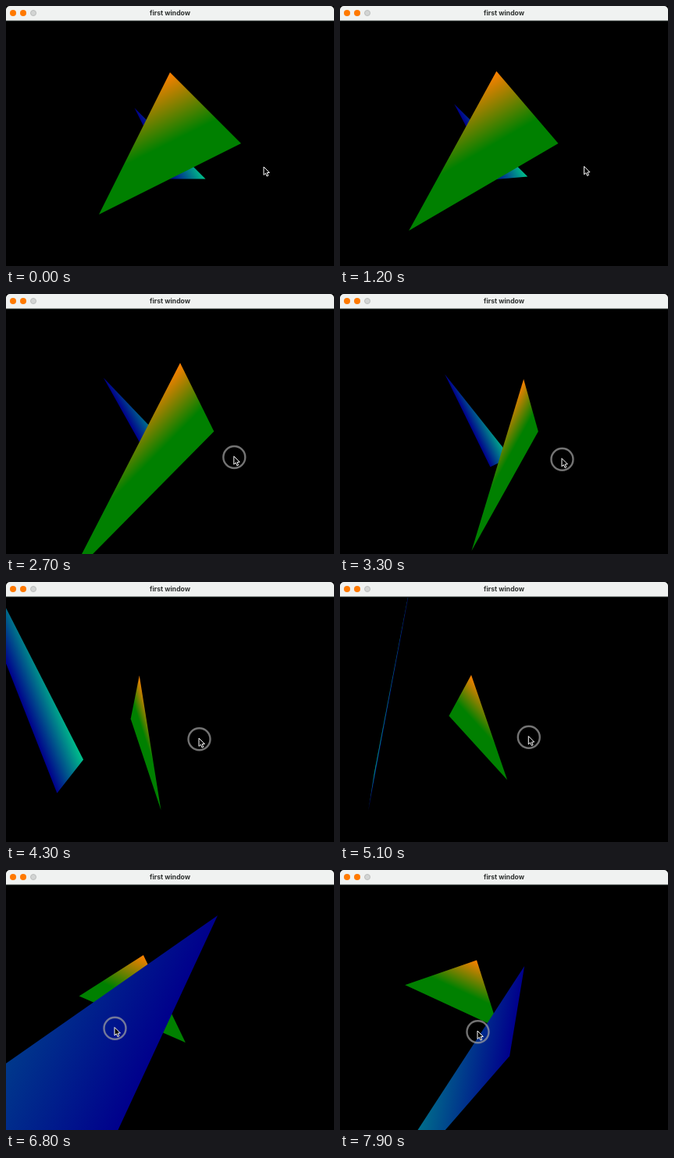
Recreate the animation shown at these times as an HTML page with a canvas. Size 420 px wide and 333 px high, loop 8 s.

```html
<!DOCTYPE html>
<html lang="en">
<head>
<meta charset="utf-8">
<title>first window</title>
<style>
  html, body { margin: 0; width: 420px; height: 333px; overflow: hidden; background: #000; }
  canvas, svg { position: absolute; left: 0; top: 0; }
  .bar {
    position: absolute; left: 0; top: 0; width: 420px; height: 18px;
    background: #f0f2f1; border-radius: 5px 5px 0 0; box-shadow: 0 1px #a0a3a2, 0 2px #161c1b;
    font: 700 8.6px/18px Inter, "Open Sans", sans-serif; color: #303332; text-align: center;
  }
  .dot {
    position: absolute; top: 5px; width: 8px; height: 8px;
    border-radius: 50%; background: #ff7900;
  }
  .off { box-sizing: border-box; background: #d2d4d3; border: 1px solid #bcbebd; }
</style>
</head>
<body>
<canvas id="scene" width="420" height="333"></canvas>
<div class="bar">
  <i class="dot" style="left:5px"></i>
  <i class="dot" style="left:18px"></i>
  <i class="dot off" style="left:31px"></i>
  first window
</div>
<svg width="420" height="333">
  <g id="pointer">
    <circle id="ring" cx="0.5" cy="1.2" r="14" fill="none" stroke="#a0a0a0" stroke-opacity=".72" stroke-width="2.4"/>
    <path d="M0 0V10.4L2.4 8.2L4 12L5.8 11.2L4.2 7.6L7.4 7.4Z" fill="#000" stroke="#fff" stroke-linejoin="round"/>
  </g>
</svg>
<script>
const LOOP = 8000, STEP = 100, PRESS = 2400;
const CX = 210, CY = 176, FOCAL = 91, NEAR = 0.04;

// World axes: right, up, away. The first corner carries its own colour.
const WARM = {
  corners: [[0, .5, 0], [.5, 0, 0], [-.5, -.5, 0]],
  stops: [[0, 'rgb(255,128,0)'], [.66, 'rgb(0,128,0)']]
};
const COOL = {
  corners: [[.5, -.5, .5], [-.5, .5, .5], [0, -.5, .5]],
  stops: [[0, 'rgb(0,195,138)'], [1, 'rgb(0,0,140)']]
};

// The camera flies round the triangles; yaw in degrees, pitch as a slope.
const PATH = [
  { t: 0, eye: [0, 0, -.5], turn: [0, 0], mouse: [330, 206] },
  { t: 2100, eye: [-.056, 0, -.489], turn: [17.1, 0], mouse: [299.5, 205] },
  { t: 3300, eye: [-.639, 0, -.296], turn: [49.7, 0], mouse: [284, 210.5] },
  { t: 4300, eye: [-.85, -.01, .21], turn: [127.8, .045], mouse: [247, 200] },
  { t: 5900, eye: [-.686, -.096, .801], turn: [171.5, .167], mouse: [235.5, 195] },
  { t: 6800, eye: [-.1, -.098, .789], turn: [195.3, .13], mouse: [139, 201.5] },
  { t: 7900, eye: [.503, -.148, .789], turn: [236.1, .18], mouse: [176, 206] }
];

const ctx = document.getElementById('scene').getContext('2d');
const pointer = document.getElementById('pointer');
const ring = document.getElementById('ring');

const mix = (a, b, k) => a.map((v, i) => v + (b[i] - v) * k);

// Pitch shears depth by height and leaves the up axis alone.
function toView(point, eye, [yaw, pitch]) {
  const [x, y, z] = point.map((v, i) => v - eye[i]);
  const a = yaw * Math.PI / 180, c = Math.cos(a), s = Math.sin(a);
  return [c * x - s * z, y, s * x + c * z + pitch * y];
}

const toStage = ([x, y, z]) => [CX + FOCAL * x / z, CY - FOCAL * y / z];

function clipNear(poly) {
  const out = [];
  poly.forEach((a, i) => {
    const b = poly[(i + 1) % poly.length];
    if (a[2] >= NEAR) out.push(a);
    if ((a[2] >= NEAR) !== (b[2] >= NEAR)) out.push(mix(a, b, (NEAR - a[2]) / (b[2] - a[2])));
  });
  return out;
}

// The colour runs from the first corner straight towards the opposite side.
function drawTriangle({ corners, stops }, eye, turn) {
  const poly = clipNear(corners.map(p => toView(p, eye, turn))).map(toStage);
  if (poly.length < 3) return;
  const [tip, p, q] = poly;
  const dx = q[0] - p[0], dy = q[1] - p[1];
  const foot = mix(p, q, ((tip[0] - p[0]) * dx + (tip[1] - p[1]) * dy) / (dx * dx + dy * dy));
  const fill = ctx.createLinearGradient(...tip, ...foot);
  stops.forEach(stop => fill.addColorStop(...stop));
  ctx.beginPath();
  poly.forEach(point => ctx.lineTo(...point));
  ctx.fillStyle = fill;
  ctx.fill();
}

function draw(t) {
  const next = Math.max(1, PATH.findIndex(key => key.t >= t));
  const a = PATH[next - 1], b = PATH[next];
  const k = (t - a.t) / (b.t - a.t);
  const eye = mix(a.eye, b.eye, k), turn = mix(a.turn, b.turn, k);

  ctx.fillStyle = '#000';
  ctx.fillRect(0, 0, 420, 333);
  // Paint the plane further from the eye first.
  const order = eye[2] > .25 ? [WARM, COOL] : [COOL, WARM];
  order.forEach(shape => drawTriangle(shape, eye, turn));

  const [mx, my] = mix(a.mouse, b.mouse, k);
  pointer.setAttribute('transform', `translate(${mx.toFixed(1)} ${my.toFixed(1)})`);
  ring.style.display = t >= PRESS ? '' : 'none';
}

const start = performance.now();
function tick() {
  const t = (performance.now() - start) % LOOP;
  draw(Math.floor(t / STEP) * STEP);
  requestAnimationFrame(tick);
}
tick();
</script>
</body>
</html>
```
